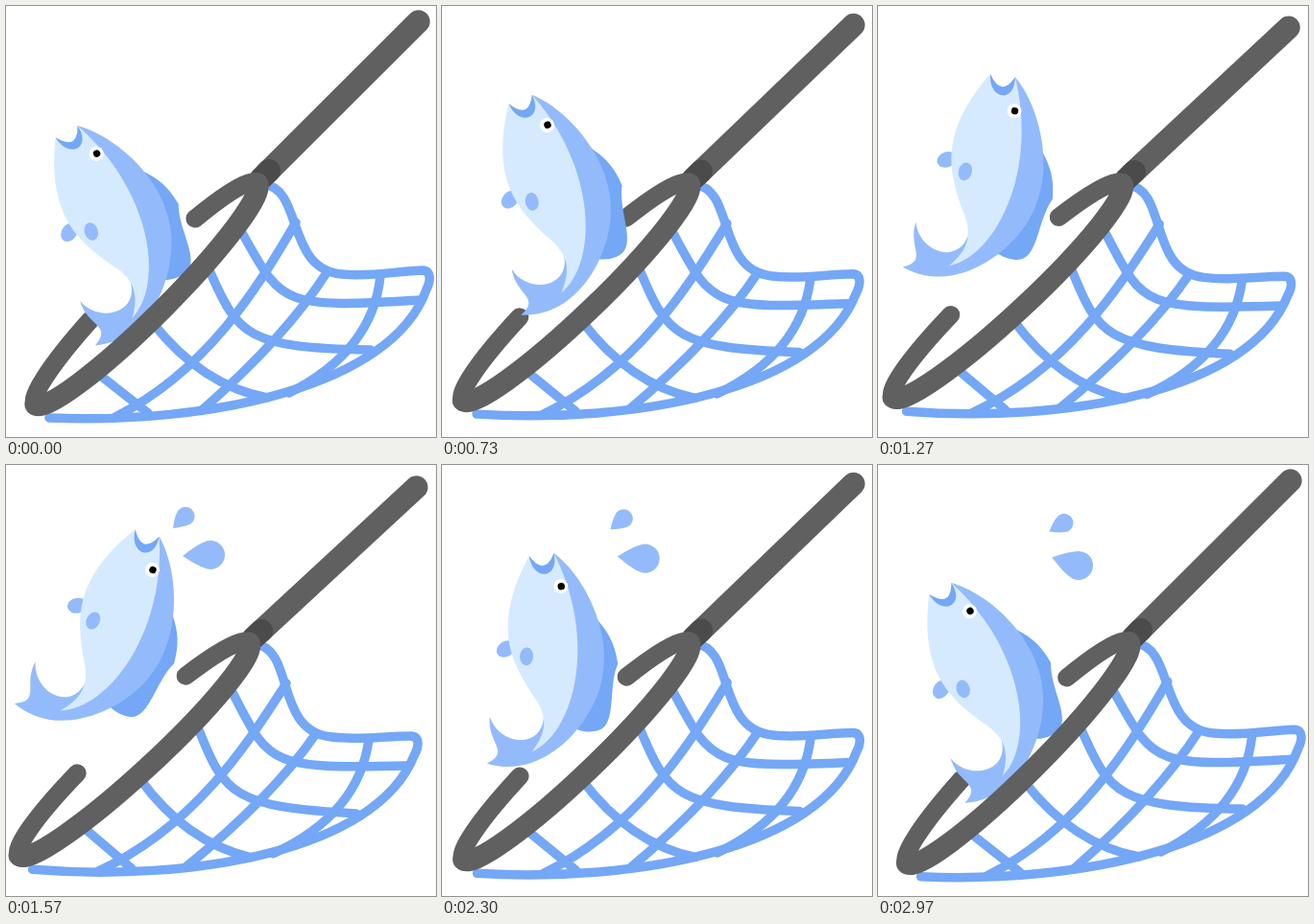
Recreate the animation shown at these times as an HTML page with a canvas. Size 448x450 px, loop 3.01 s.

```html
<!DOCTYPE html>
<html lang="en">
<head>
<meta charset="utf-8">
<title>Fish and landing net</title>
<style>
html, body { margin: 0; width: 100%; height: 100%; overflow: hidden; background: #fff; }
canvas { display: block; }
</style>
</head>
<body>
<canvas id="stage" width="448" height="450"></canvas>
<script>
const ctx = document.getElementById('stage').getContext('2d');
const LOOP = 3010, STEPS = 90, STEP_MS = 100 / 3;
const GREY = '#606060', JOINT = '#4b4b4b';
const DEEP = '#74a7f6', MID = '#93bbfc', PALE = '#d6eaff';
const RAD = Math.PI / 180;

// Net: a rim, strands leaving the hoop, strands crossing them
const rim = new Path2D('M268 186C310 190 291 275 350 280C380 283 405 277 434 276' +
  'C444 276 442 288 438 296C402 398 210 437 45 430');
const along = new Path2D('M245 235C288 312 285 316 432 307M212 276C242 345 252 357 380 359' +
  'M153 331Q204 396 272 409M96 384L148 425');
const across = new Path2D('M302 226C268 283 216 377 114 429M335 277Q292 345 204 422' +
  'M390 282Q382 360 295 404');

// Fish parts
const back = new Path2D('M132 84C160 112 184 180 158 232C138 272 84 316 31 291' +
  'C58 282 34 270 41 243C46 274 90 286 97 250Z');
const belly = new Path2D('M106 83C56 150 72 190 89 228C103 255 95 270 79 286' +
  'C127 272 164 180 132 84Q119 107 106 83Z');
const mouth = new Path2D('M106 83C106 110 134 112 132 84Q119 107 106 83Z');
const dorsal = new Path2D('M160 150C176 172 181 185 181 208C166 232 172 276 146 274Q135 274 125 267Z');

// Linear interpolation over [phase, value] pairs
function track(keys, p) {
  let i = 1;
  while (i < keys.length - 1 && p > keys[i][0]) i++;
  const [p0, a] = keys[i - 1], [p1, b] = keys[i];
  return a + (b - a) * (p - p0) / (p1 - p0);
}

function fill(path, color) {
  ctx.fillStyle = color;
  ctx.fill(path);
}

function oval(x, y, rx, ry, deg, color) {
  ctx.fillStyle = color;
  ctx.beginPath();
  ctx.ellipse(x, y, rx, ry, deg * RAD, 0, 7);
  ctx.fill();
}

function disc(x, y, r, color) {
  oval(x, y, r, r, 0, color);
}

function pen(color, width) {
  ctx.strokeStyle = color;
  ctx.lineWidth = width;
  ctx.lineCap = 'round';
}

function bar(x0, y0, x1, y1, color) {
  pen(color, 24);
  ctx.beginPath();
  ctx.moveTo(x0, y0);
  ctx.lineTo(x1, y1);
  ctx.stroke();
}

function hoop(from, to, width) {
  pen(GREY, width);
  ctx.beginPath();
  ctx.ellipse(146, 300.5, 163.5, 23.5, -45 * RAD, from * RAD, to * RAD);
  ctx.stroke();
}

function frontHoop() {
  hoop(0, 180, 22);
}

function net() {
  pen(DEEP, 9.5);
  [rim, along, across].forEach(p => ctx.stroke(p));
  bar(429.7, 16.2, 272, 174, GREY);
  bar(274, 172, 266, 180, JOINT);
  hoop(-56, 248.3, 19);
}

// The net rocks to one side and back at constant speed
function swing(p, draw) {
  ctx.save();
  ctx.translate(242, -38);
  ctx.rotate(2.25 * RAD * (1 - Math.abs(1 - 2 * p)));
  ctx.translate(-242, 38);
  draw();
  ctx.restore();
}

function fish(p) {
  ctx.save();
  ctx.translate(
    track([[0, 109], [0.25, 115], [0.5, 111.5], [1, 109]], p),
    track([[0, 226.5], [0.5, 168], [1, 226.5]], p));
  ctx.rotate(RAD * track([[0, -30.6], [0.25, -23], [0.5, 17], [1, -30.6]], p));
  ctx.translate(-110, -189);
  oval(68, 175.5, 10.5, 8, -25, MID);
  fill(dorsal, DEEP);
  fill(back, MID);
  fill(belly, PALE);
  fill(mouth, DEEP);
  oval(88, 186.5, 7, 9.5, 12, MID);
  disc(134, 119.3, 7.5, '#fff');
  disc(134.5, 119.3, 3.7, '#000');
  ctx.restore();
}

// Teardrop: round end at x,y, tip at distance len
function drop(x, y, r, len, deg) {
  ctx.save();
  ctx.translate(x, y);
  ctx.rotate(deg * RAD);
  ctx.fillStyle = MID;
  ctx.beginPath();
  ctx.moveTo(-len, 0);
  ctx.quadraticCurveTo(-r * 0.9, -r * 0.75, -r * 0.45, -r * 0.89);
  ctx.arc(0, 0, r, -117 * RAD, 117 * RAD);
  ctx.quadraticCurveTo(-r * 0.9, r * 0.75, -len, 0);
  ctx.fill();
  ctx.restore();
}

function drops(p) {
  const sway = Math.abs(1 - 2 * ((p * 3) % 1));
  const s = (sway - 0.14) / 0.8;
  drop(213 - 4 * s, 94 + 11 * s, 15, 29, -2 + 19 * s);
  drop(187 + 7 * s, 53.5 + 7 * s, 9.6, 18, -44 + 14 * s);
}

function render(ms) {
  const step = Math.floor((ms % LOOP) / STEP_MS + 0.15);
  const p = Math.min(STEPS - 1, step) / STEPS;
  ctx.fillStyle = '#fff';
  ctx.fillRect(0, 0, 448, 450);
  swing(p, net);
  fish(p);
  swing(p, frontHoop);
  if (p >= 0.5) drops(p);
}

const begin = performance.now();
function tick() {
  render(performance.now() - begin);
  requestAnimationFrame(tick);
}
tick();
</script>
</body>
</html>
```
